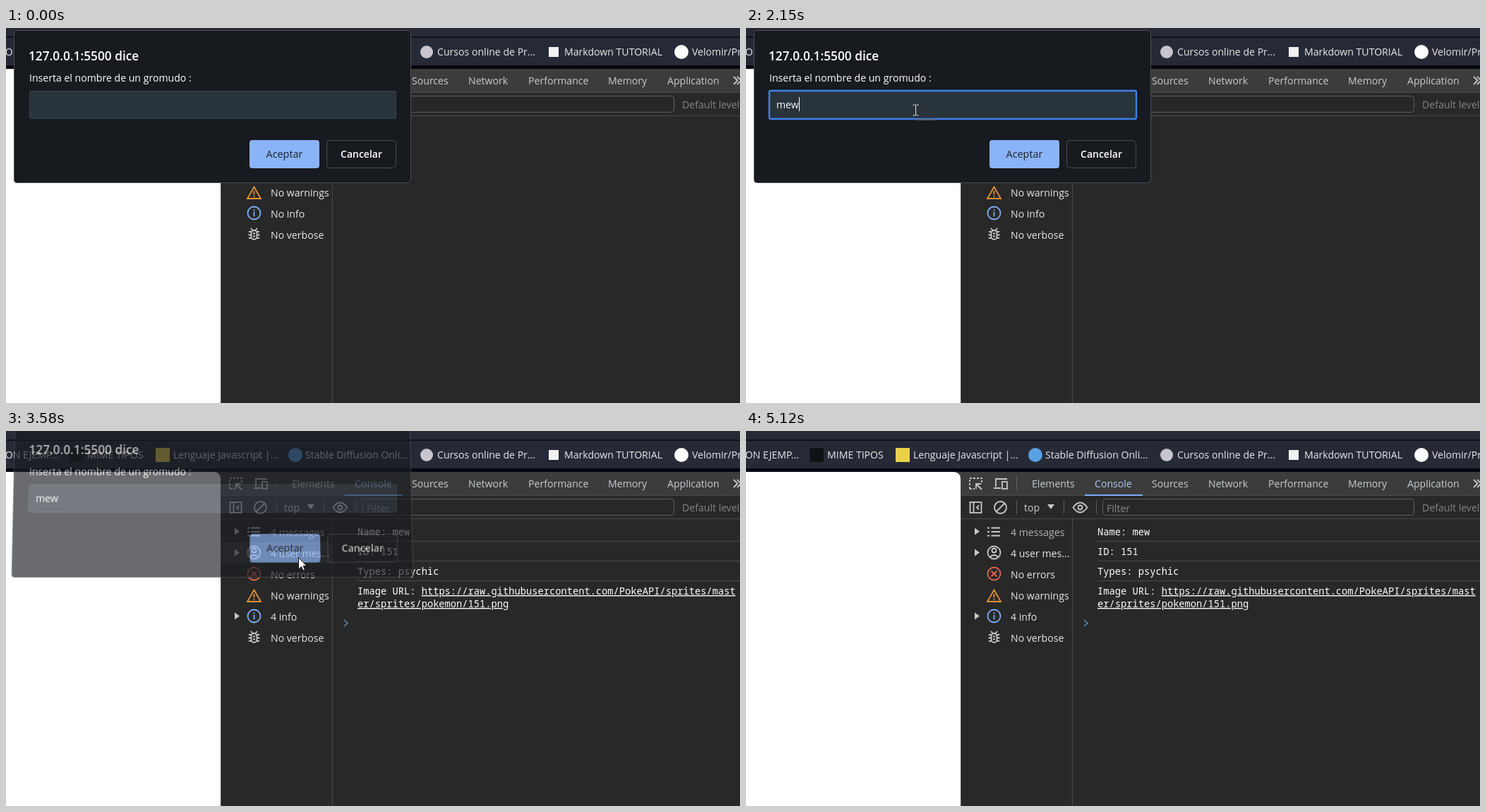
Write an HTML page that moves like this. It is 1040 px wide and 532 px high and loops after 6.11 s.

```html
<!DOCTYPE html>
<html lang="es">
<head>
<meta charset="utf-8">
<title>Consola</title>
<style>
  html, body { margin: 0; width: 100%; height: 100%; overflow: hidden; background: #282828; }
  #stage { position: relative; width: 100%; height: 100%; overflow: clip; contain: paint; }
  svg { position: absolute; left: 0; top: 0; width: 100%; height: 100%; overflow: hidden; }
  text { font: 14.1px "Open Sans", "Noto Sans", sans-serif; fill: #e8e8e8; white-space: pre; }
  .tabs text { fill: #c9cbce; }
  .mono text { font: 500 13.74px "Noto Sans Mono", "DejaVu Sans Mono", monospace; fill: #fff; }
  .link { text-decoration: underline; }
  .line { fill: none; stroke: #c7c7c7; stroke-width: 1.8; }
  .rule { fill: none; stroke: #4a4a4a; }
  #dialog { width: 586px; height: 224px; transform-origin: 293px 112px; }
  #dialog text { fill: #fff; }
</style>
</head>
<body>
<div id="stage">
<svg viewBox="0 0 1040 532">
  <rect width="1040" height="58" fill="#262a36"/>
  <rect y="12" width="1040" height="2" fill="#0e101a"/>
  <rect y="53" width="1040" height="5" fill="#05060f"/>
  <g id="bookmarks">
    <rect x="90" y="24" width="20" height="20" rx="2" fill="#111216"/>
    <rect x="212" y="24" width="20" height="20" fill="#ead04a"/>
    <circle cx="410" cy="34" r="10" fill="#5a9fe2"/>
    <circle cx="596" cy="34" r="9" fill="#c9c5cc"/>
    <rect x="769" y="27" width="14" height="14" fill="#f2f2f2"/>
    <circle cx="957" cy="34" r="10" fill="#fff"/>
    <text x="75" y="39" text-anchor="end">JSON EJEMP...</text>
  </g>

  <rect y="58" width="304" height="474" fill="#3c3c3c"/>
  <path d="M0 58H293Q304 58 304 69V532H0Z" fill="#fff"/>
  <rect x="304" y="58" width="736" height="474" fill="#282828"/>
  <rect x="304" y="58" width="736" height="33" fill="#3c3c3c"/>
  <path class="rule" d="M304.5 58V532M304 91.5H1040M304 124.5H1040M462.5 125V532"/>
  <path class="rule" style="stroke:#5e5e5e" d="M383.5 64V84M383.5 98V118M450.5 98V118M496.5 98V118"/>
  <rect x="480" y="90" width="82" height="2" fill="#7cacf8"/>
  <g class="tabs" id="tabs"></g>
  <rect x="505.5" y="96.5" width="441" height="23" rx="4" class="rule" style="stroke:#5e5e5e"/>
  <text x="394" y="114" style="fill:#c9cbce">top</text>
  <text x="511" y="115" style="fill:#858585">Filter</text>
  <text x="958" y="114" style="fill:#858585">Default levels</text>
  <path d="M427 104H437L432 111Z" fill="#c7c7c7"/>

  <g class="line">
    <path d="M317 82V67H334V73" stroke-dasharray="3 2"/>
    <path d="M317 82H324" stroke-dasharray="3 2"/>
    <path d="M334 83L326 75M326 82V75H333"/>
    <path d="M354 79V68H370M351 81H361"/>
    <rect x="363" y="72" width="7" height="10"/>
    <rect x="317.5" y="101" width="16" height="15"/>
    <path d="M322.5 101V116M330 105.5L327 108.5L330 111.5"/>
    <circle cx="360.5" cy="108.5" r="8.5"/>
    <path d="M354.5 114.5L366.5 102.5"/>
    <path d="M463.5 108.5Q473.5 94.5 483.5 108.5Q473.5 122.5 463.5 108.5Z"/>
    <circle cx="473.5" cy="108.5" r="3"/>
    <path d="M1031 69L1036.5 74.5L1031 80M1036 69L1041.5 74.5L1036 80"/>
  </g>

  <rect id="hover" x="305" y="158" width="157" height="30" fill="#3c3c3c"/>
  <g class="line">
    <path d="M342 137.5H345M342 143H345M342 148.5H345M347.5 137.5H360M347.5 143H360M347.5 148.5H360"/>
    <circle cx="351.5" cy="172.5" r="9"/>
    <circle cx="351.5" cy="169.5" r="3"/>
    <path d="M345.5 179Q351.5 173 357.5 179"/>
    <g stroke="#e0694c">
      <circle cx="351.5" cy="202.5" r="9"/>
      <path d="M347.5 198.5L355.5 206.5M355.5 198.5L347.5 206.5"/>
    </g>
    <path stroke="#e8933a" d="M351.5 225.5L361 242H342ZM351.5 231V236.5M351.5 238V240"/>
    <g stroke="#7cb0f5">
      <circle cx="351.5" cy="262.5" r="9"/>
      <path d="M351.5 261V267.5M351.5 257.5V259.5"/>
    </g>
    <rect x="347.5" y="287" width="8" height="13" rx="4"/>
    <path d="M344 289H347M356 289H359M343.5 293.5H347M356 293.5H359.5M344 298H347M356 298H359M347 284L349.5 287M356 284L353.5 287M350 291.5H353M350 295.5H353"/>
  </g>
  <g id="sidebar"></g>
  <g id="output">
    <path d="M324 137.5L331 142.5L324 147.5ZM324 167.5L331 172.5L324 177.5ZM324 257.5L331 262.5L324 267.5Z" fill="#c7c7c7"/>
    <path class="rule" d="M498 156.5H1040M498 184.5H1040M498 212.5H1040"/>
    <g class="mono">
      <text x="498" y="148">Name: mew</text>
      <text x="498" y="176">ID: 151</text>
      <text x="498" y="204">Types: psychic</text>
      <text x="498" y="232">Image URL: <tspan class="link">https://raw.githubusercontent.com/PokeAPI/sprites/mast</tspan></text>
      <text x="498" y="250" class="link">er/sprites/pokemon/151.png</text>
    </g>
    <path d="M479 268L484 272.5L479 277" fill="none" stroke="#5f8fc4" stroke-width="1.5"/>
  </g>
</svg>

<svg id="dialog" viewBox="0 0 586 224">
  <rect x="11.5" y="3.5" width="562" height="216" rx="4" fill="#171a1e" stroke="#4b4e52"/>
  <text x="32" y="46" style="font-size:17.3px;font-weight:600">127.0.0.1:5500 dice</text>
  <text x="33" y="76">Inserta el nombre de un gromudo :</text>
  <rect x="33.5" y="89.5" width="519" height="39" rx="2" fill="#29333b" stroke="#3a444b"/>
  <g id="focus">
    <rect x="33" y="89" width="520" height="40" rx="2" fill="none" stroke="#4080ea" stroke-width="2.4"/>
    <rect x="240" y="129" width="29" height="2" fill="#5a6472"/>
  </g>
  <text id="typed" x="43" y="114"></text>
  <rect id="caret" y="98" width="1" height="20" fill="#fff"/>
  <rect x="345" y="159" width="99" height="40" rx="4" fill="#8ab3f8"/>
  <text x="394.5" y="184" text-anchor="middle" style="fill:#1c222b;font-weight:500;font-size:14.4px">Aceptar</text>
  <rect x="454.5" y="159.5" width="98" height="39" rx="4" fill="none" stroke="#4b4e52"/>
  <text x="503.5" y="184" text-anchor="middle" style="font-weight:600;font-size:14px">Cancelar</text>
</svg>

<svg viewBox="0 0 1040 532">
  <path id="arrow" d="M0 0V16.5L4 13L6.5 18.5L9 17.4L6.7 12H11.5Z" fill="#fff" stroke="#111"/>
  <path id="beam" d="M-4 -7.5H-1L0 -6.5L1 -7.5H4M0 -7V7M-4 7.5H-1L0 6.5L1 7.5H4" fill="none" stroke="#e4e4e4"/>
</svg>
</div>

<script>
  const LOOP = 6110, FOCUS = 1210, CLOSE = 3460, PRINT = 3540, GONE = 3680;
  const $ = id => document.getElementById(id);

  // time, x, y of the pointer's hot spot
  const POINTER = [
    [210, 969, 520], [360, 820, 440], [520, 560, 300], [680, 370, 190], [820, 278, 142],
    [1000, 246, 120], [1130, 240, 116], [2840, 240, 116], [2960, 310, 140], [3060, 415, 174],
    [3130, 438, 179], [3220, 442, 180], [3340, 422, 179], [3420, 414, 179], [3840, 414, 179],
    [4000, 420, 201], [4150, 440, 240], [4300, 492, 303], [4450, 571, 364], [4550, 665, 420],
    [4700, 768, 473], [4900, 842, 508], [5080, 872, 526], [5120, 876, 533]
  ];
  const FADE = [[CLOSE, 1], [3520, .93], [3580, .655], [3660, .065], [GONE, 0]];
  // time, typed text, caret x (0 = hidden)
  const TYPING = [
    [0, "", 0], [FOCUS, "", 43], [1740, "", 0], [1970, "m", 56], [2060, "me", 64],
    [2150, "mew", 75], [2680, "mew", 0], [3210, "mew", 75], [CLOSE, "mew", 0]
  ];

  function addText(parent, x, y, content, fill) {
    const el = document.createElementNS("http://www.w3.org/2000/svg", "text");
    el.setAttribute("x", x);
    el.setAttribute("y", y);
    if (fill) el.style.fill = fill;
    el.textContent = content;
    return $(parent).appendChild(el);
  }

  [[115, "MIME TIPOS"], [237, "Lenguaje Javascript |..."], [424, "Stable Diffusion Onli..."],
   [611, "Cursos online de Pr..."], [791, "Markdown TUTORIAL"], [972, "Velomir/Proyecto"]]
    .forEach(([x, label]) => addText("bookmarks", x, 39, label));

  [[405, "Elements"], [494, "Console", "#a9c8f2"], [575, "Sources"], [655, "Network"],
   [740, "Performance"], [853, "Memory"], [937, "Application"]]
    .forEach(([x, label, fill]) => addText("tabs", x, 80, label, fill));

  const before = ["No messages", "No user me...", "No errors", "No warnings", "No info", "No verbose"];
  const after = ["4 messages", "4 user mes...", "No errors", "No warnings", "4 info", "No verbose"];
  const rows = before.map((label, i) => addText("sidebar", 375, 149 + 30 * i, label, i ? "" : "#b4b4b4"));

  function sample(table, t) {
    const next = table.findIndex(row => row[0] > t);
    if (next === 0) return table[0].slice(1);
    if (next < 0) return table[table.length - 1].slice(1);
    const a = table[next - 1], b = table[next];
    const k = (t - a[0]) / (b[0] - a[0]);
    return a.slice(1).map((v, i) => v + (b[i + 1] - v) * k);
  }

  const show = (id, on) => { $(id).style.display = on ? "" : "none"; };

  // On closing, the dialog rises, tips its lower edge forward and fades.
  function drawDialog(t) {
    const [, typed, caretX] = TYPING.filter(row => row[0] <= t).pop();
    const k = Math.max(0, (t - CLOSE) / 200);
    $("typed").textContent = typed;
    $("caret").setAttribute("x", caretX);
    show("caret", caretX > 0);
    show("focus", t >= FOCUS && t < CLOSE);
    show("dialog", t < GONE);
    $("dialog").style.opacity = sample(FADE, t)[0];
    $("dialog").style.transform = k
      ? `translateY(${-22 * k}px) perspective(400px) rotateX(${2.9 * k}deg) scale(${1 + .006 * k})`
      : "none";
  }

  function drawPointer(t) {
    const [x, y] = sample(POINTER, t);
    const visible = t >= 210 && t < 5120;
    const inField = t < CLOSE && x > 32 && x < 554 && y > 88 && y < 130;
    show("arrow", visible && !inField);
    show("beam", visible && inField);
    for (const id of ["arrow", "beam"])
      $(id).setAttribute("transform", `translate(${Math.round(x) + .5} ${Math.round(y) + .5})`);
    show("hover", t >= PRINT && x < 462 && y >= 158 && y < 188);
  }

  function draw(t) {
    const printed = t >= PRINT;
    show("output", printed);
    rows.forEach((row, i) => { row.textContent = (printed ? after : before)[i]; });
    drawDialog(t);
    drawPointer(t);
  }

  const start = performance.now();
  function tick() {
    draw((performance.now() - start) % LOOP);
    requestAnimationFrame(tick);
  }
  tick();
</script>
</body>
</html>
```
